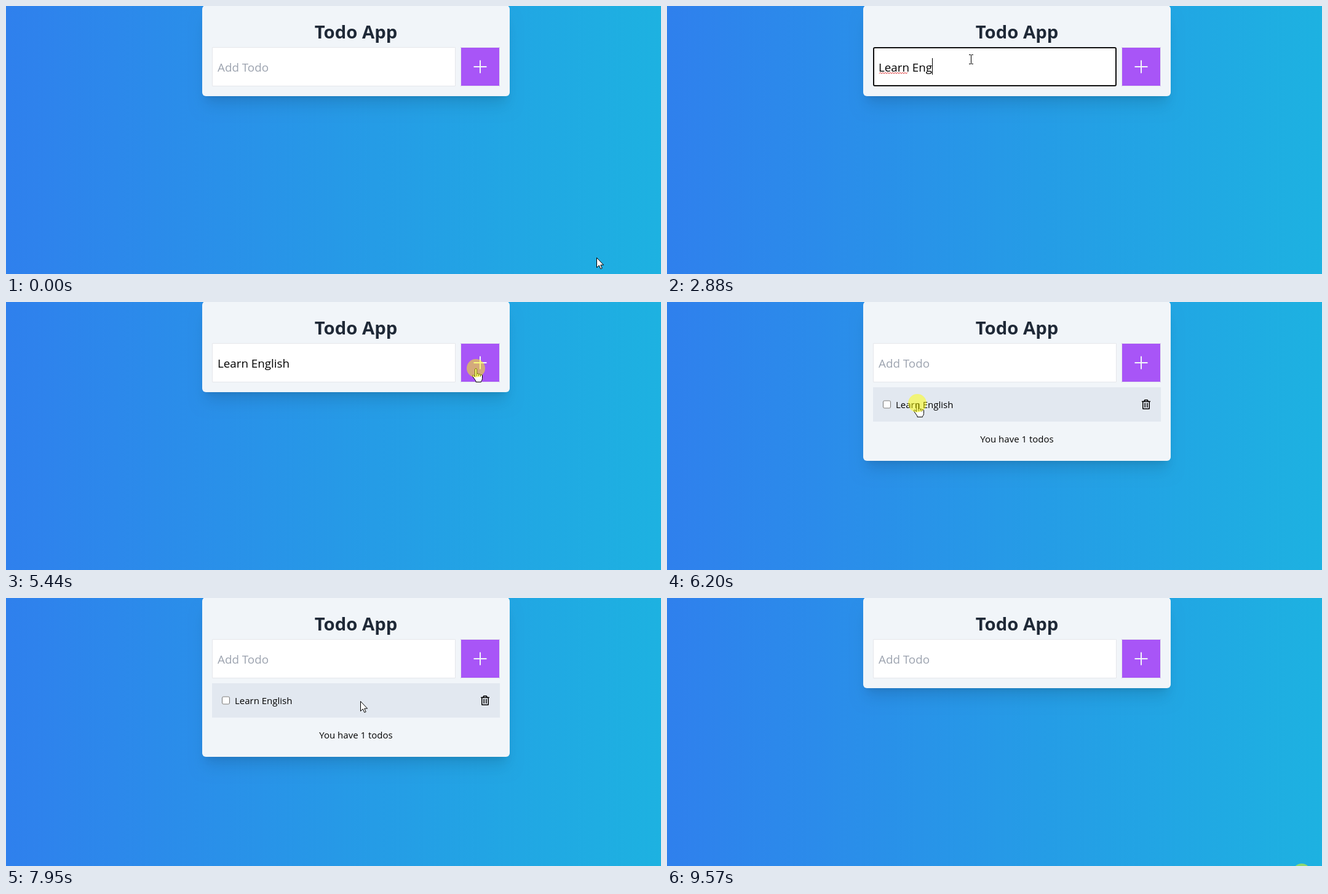
Recreate the animation shown at these times as an HTML page with a canvas. Size 1065 by 437 pixels, loop 9.64 s.

```html
<!DOCTYPE html>
<html lang="en">
<head>
<meta charset="utf-8">
<title>Todo App</title>
<style>
  html, body { margin: 0; width: 100%; height: 100%; overflow: hidden; }
  canvas { display: block; }
</style>
</head>
<body>
<canvas id="stage" width="1065" height="437"></canvas>
<script>
const ctx = document.getElementById('stage').getContext('2d');
const LOOP = 9640;
const STEP = 75;
const BLINK = 530;
const TASK = 'Learn English';
const FOCUS = [570, 5440];
const LISTED = [5590, 8760];
const DONE = [6270, 7000];
const CLICKS = [[570, 720], [5440, 5590], [6200, 6270], [6860, 7000], [8620, 8760], [9570, LOOP]];

// [time, characters typed so far]
const KEYS = [[1430, 1], [1560, 2], [1830, 3], [1960, 4], [2090, 5], [2290, 6],
  [2620, 7], [2750, 8], [2880, 9], [3100, 10], [3300, 12], [3560, 13]];

// [start, steps, x, y, optional control x, y]
const START = [960, 410];
const MOVES = [
  [70, 7, 494, 87],
  [4820, 8, 764, 108, 640, 24],
  [5590, 8, 407, 165],
  [7020, 7, 569, 168],
  [7950, 9, 779, 158],
  [8780, 2, 784, 166],
  [8970, 3, 860, 380],
  [9121, 1, 1032, 448],
];

const ARROW = new Path2D('M.5.5V16.5L4.3 13 6.8 18.6 9.2 17.6 6.8 12.2H11.6Z');
const BEAM = new Path2D('M-3-7.5H0M1-7.5H4M.5-7V7M-3 7.5H0M1 7.5H4');
const HAND = new Path2D('M-1.5 14V2Q-1.5.5 0 .5T1.5 2V9Q4.5 7.5 4.5 10Q7.5 8.5 7.5 11' +
  'Q10.5 9.5 10.5 12V16.5Q10.5 19.5 8.5 21.5V22.5H0V21L-4.8 14Q-6.5 11.5-4.7 11Q-3.3 10.8-1.5 14Z');
const KNUCKLES = new Path2D('M1.5 9V13M4.5 10V13M7.5 11V13.5');
const BIN = new Path2D('M0 3.25H14M1.75 3.5V14.5Q1.75 15.25 2.5 15.25H11.5Q12.25 15.25 12.25 14.5V3.5' +
  'M5.25 5.5V13M8.75 5.5V13M3.6 3L5 .75H9L10.4 3');
const TICK = new Path2D('M3 6.8L5.4 9.2L10.2 3.8');

const within = (t, [from, to]) => t >= from && t < to;
const inBox = (x, y, l, t, r, b) => x >= l && x < r && y >= t && y < b;
const smooth = u => u * u * (3 - 2 * u);

function fill(color, x, y, w, h, radius = 0) {
  ctx.fillStyle = color;
  ctx.beginPath();
  ctx.roundRect(x, y, w, h, radius);
  ctx.fill();
}

function outline(color, width, x, y, w, h, radius = 0) {
  ctx.strokeStyle = color;
  ctx.lineWidth = width;
  ctx.beginPath();
  ctx.roundRect(x + width / 2, y + width / 2, w - width, h - width, radius);
  ctx.stroke();
}

function label(text, x, y, size, color = '#000', align = 'left', weight = 400) {
  ctx.font = `${weight} ${size}px "Open Sans", "Noto Sans", sans-serif`;
  ctx.fillStyle = color;
  ctx.textAlign = align;
  ctx.fillText(text, x, y);
  return ctx.measureText(text).width;
}

function strokeAt(path, x, y, color, width) {
  ctx.save();
  ctx.translate(x, y);
  ctx.strokeStyle = color;
  ctx.lineWidth = width;
  ctx.stroke(path);
  ctx.restore();
}

function pointerAt(t) {
  let [x, y] = START;
  for (const [start, steps, toX, toY, midX = (x + toX) / 2, midY = (y + toY) / 2] of MOVES) {
    if (t < start) break;
    const u = smooth(Math.min(1, (Math.floor((t - start) / STEP) + 1) / steps));
    const v = 1 - u;
    x = v * v * x + 2 * u * v * midX + u * u * toX;
    y = v * v * y + 2 * u * v * midY + u * u * toY;
  }
  return [Math.round(x), Math.round(y)];
}

function drawBackground() {
  const sky = ctx.createLinearGradient(0, 0, 1138, 0);
  sky.addColorStop(0, '#2f80ed');
  sky.addColorStop(1, '#1cb5e0');
  ctx.fillStyle = sky;
  ctx.fillRect(0, 0, 1065, 437);
}

function drawCard(height) {
  for (const [offset, blur, inset] of [[20, 25, 5], [8, 10, 6]]) {
    ctx.save();
    ctx.shadowColor = 'rgba(0,0,0,.1)';
    ctx.shadowBlur = blur;
    ctx.shadowOffsetY = offset;
    fill('#f1f5f9', 319 + inset, inset - 1, 500 - 2 * inset, height - 2 * inset, 4);
    ctx.restore();
  }
  fill('#f1f5f9', 319, -1, 500, height, 6);
  label('Todo App', 569, 53, 29.3, '#1f2937', 'center', 700);
}

function drawSquiggle(from, to) {
  ctx.strokeStyle = '#e02020';
  ctx.lineWidth = 1;
  ctx.beginPath();
  for (let x = from, up = 0; x <= to; x += 2, up ^= 1) ctx.lineTo(x, up ? 108.3 : 110.3);
  ctx.stroke();
}

function drawInput(t) {
  const focused = within(t, FOCUS);
  const [lastKey, count] = KEYS.findLast(([time]) => t >= time) || [FOCUS[0], 0];
  const typed = t < LISTED[0] ? TASK.slice(0, count) : '';

  fill('#fff', 335, 67, 396, 64, focused ? 3 : 0);
  if (focused) outline('#101010', 2, 335, 67, 396, 64, 2);
  else outline('#e5e7eb', 1, 335, 67, 396, 64);

  const width = typed ? label(typed, 344, 107, 18.8) : 0;
  if (!typed) label('Add Todo', 344, 107, 18.8, '#9ca3af');
  if (!focused) return;
  if (count > 5) drawSquiggle(345, 392);
  if (Math.floor((t - lastKey) / BLINK) % 2 === 0) {
    fill('#000', Math.round(344 + width), 85, 1, 27);
  }
}

function drawButton() {
  fill('#a855f7', 739, 67, 64, 64);
  outline('#e5e7eb', 1, 739, 67, 64, 64);
  fill('#f1f5f9', 770, 88.5, 2, 21);
  fill('#f1f5f9', 760.5, 98, 21, 2.1);
}

function drawTask(done) {
  fill(done ? '#94a3b8' : '#e2e8f0', 335, 139, 468, 56);
  if (done) {
    fill('#0075ff', 351, 160.5, 13, 13, 2);
    strokeAt(TICK, 351, 160.5, '#fff', 2);
  } else {
    fill('#fff', 351, 160.5, 13, 13, 2.5);
    outline('#767676', 1, 351, 160.5, 13, 13, 2);
  }
  const width = label(TASK, 372, 173, 15);
  if (done) fill('#000', 372, 168, width, 1);
  strokeAt(BIN, 772, 159, '#000', 1.5);
  label('You have 1 todos', 569, 229, 15, '#000', 'center');
}

function drawPointer(x, y, listed) {
  const overInput = inBox(x, y, 335, 67, 731, 131);
  const overLink = inBox(x, y, 739, 67, 803, 131) ||
    listed && (inBox(x, y, 372, 155, 466, 179) || inBox(x, y, 772, 155, 786, 179));
  if (overInput) return strokeAt(BEAM, x, y, '#000', 1);
  const shape = overLink ? HAND : ARROW;
  ctx.save();
  ctx.translate(x, y);
  ctx.fillStyle = '#fff';
  ctx.fill(shape);
  ctx.restore();
  strokeAt(shape, x, y, '#000', 1);
  if (overLink) strokeAt(KNUCKLES, x, y, '#000', 1);
}

function draw(t) {
  const listed = within(t, LISTED);
  drawBackground();
  drawCard(listed ? 260 : 148);
  drawInput(t);
  drawButton();
  if (listed) drawTask(within(t, DONE));

  const [x, y] = pointerAt(t);
  drawPointer(x, y, listed);
  if (CLICKS.some(span => within(t, span))) {
    fill('rgba(255,255,0,.5)', x - 15, y - 15, 30, 30, 15);
  }
}

const origin = performance.now();
function frame() {
  draw((performance.now() - origin) % LOOP);
  requestAnimationFrame(frame);
}
frame();
</script>
</body>
</html>
```
